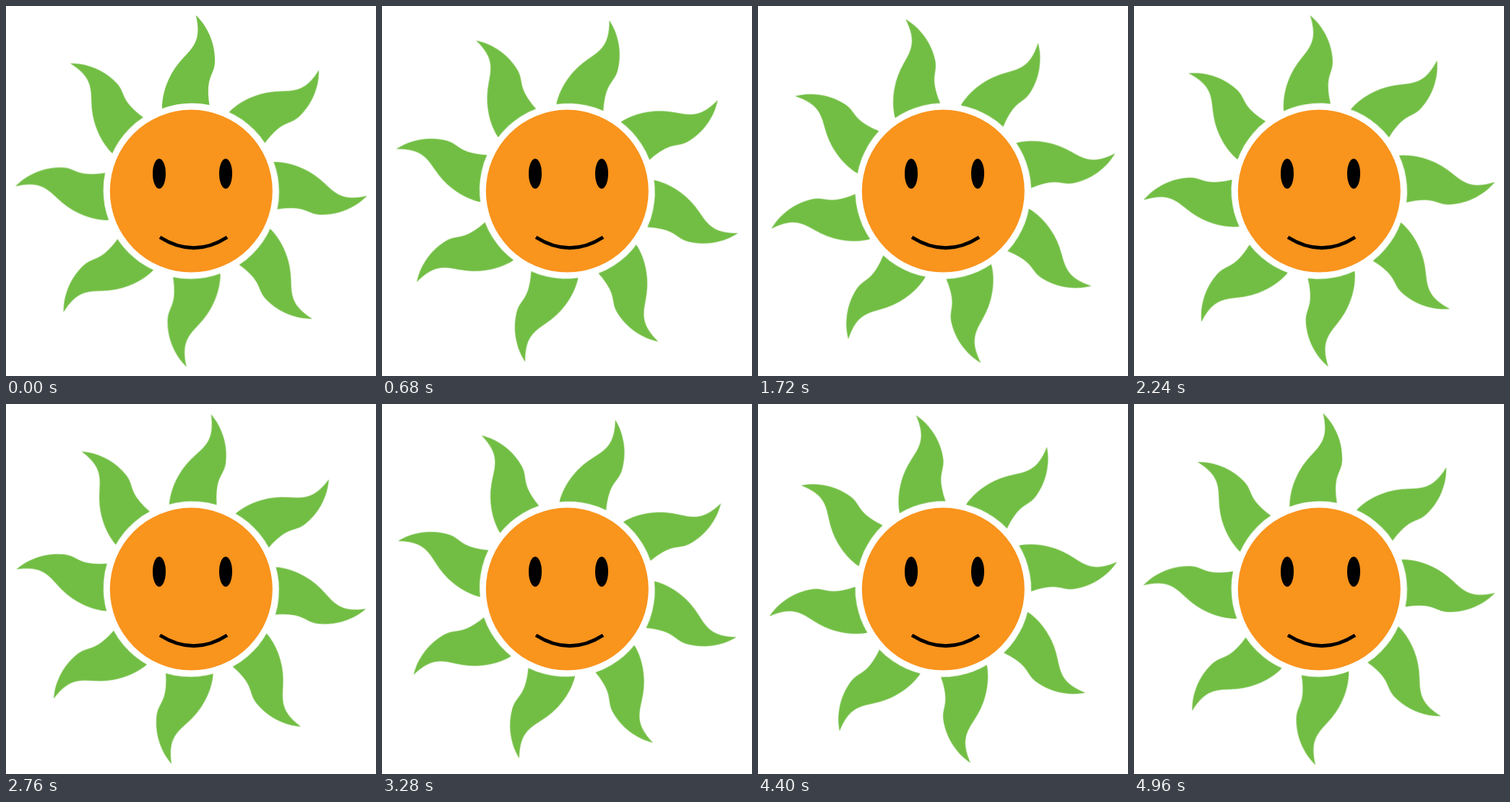
An HTML page that plays this animation: 512x512 px, repeating every 5000 ms.

```html
<!DOCTYPE html>
<html lang="en">
<head>
<meta charset="utf-8">
<title>Smiling sun</title>
<style>
  html, body { margin: 0; width: 100%; height: 100%; overflow: hidden; background: #fff; }
  svg { display: block; width: 100%; height: 100%; }
  #rays { fill: #72be44; transform-origin: 256.3px 256.1px; }
</style>
</head>
<body>
<svg viewBox="0 0 512 512">
  <defs>
    <path id="ray" d="M262.8 12.8 C279 28 290 53 289 77 C288.5 97 275.5 96 281.5 137
      A121 121 0 0 0 216 142 C216 117 227 92 243 74.5 C259 57 271 48 262.8 12.8Z"/>
  </defs>
  <g id="rays"></g>
  <circle cx="256.3" cy="256.1" r="112.5" fill="#f9941d"/>
  <ellipse cx="212" cy="232" rx="9" ry="20.7"/>
  <ellipse cx="304" cy="232" rx="9" ry="20.7"/>
  <path d="M213 320 Q260 349.5 306 320" fill="none" stroke="#000" stroke-width="5"/>
</svg>
<script>
  const COUNT = 8, LOOP = 5000, STEP = 40;
  const rays = document.getElementById('rays');

  for (let i = 0; i < COUNT; i++) {
    const ray = document.createElementNS('http://www.w3.org/2000/svg', 'use');
    ray.setAttribute('href', '#ray');
    ray.setAttribute('transform', `rotate(${i * 360 / COUNT} 256.3 256.1)`);
    rays.append(ray);
  }

  // Almost a quarter turn per loop, in even ticks that include both ends
  rays.animate(
    [{ transform: 'rotate(0deg)' }, { transform: 'rotate(89.7deg)' }],
    { duration: LOOP, iterations: Infinity, easing: `steps(${LOOP / STEP}, jump-none)` }
  );
</script>
</body>
</html>
```
